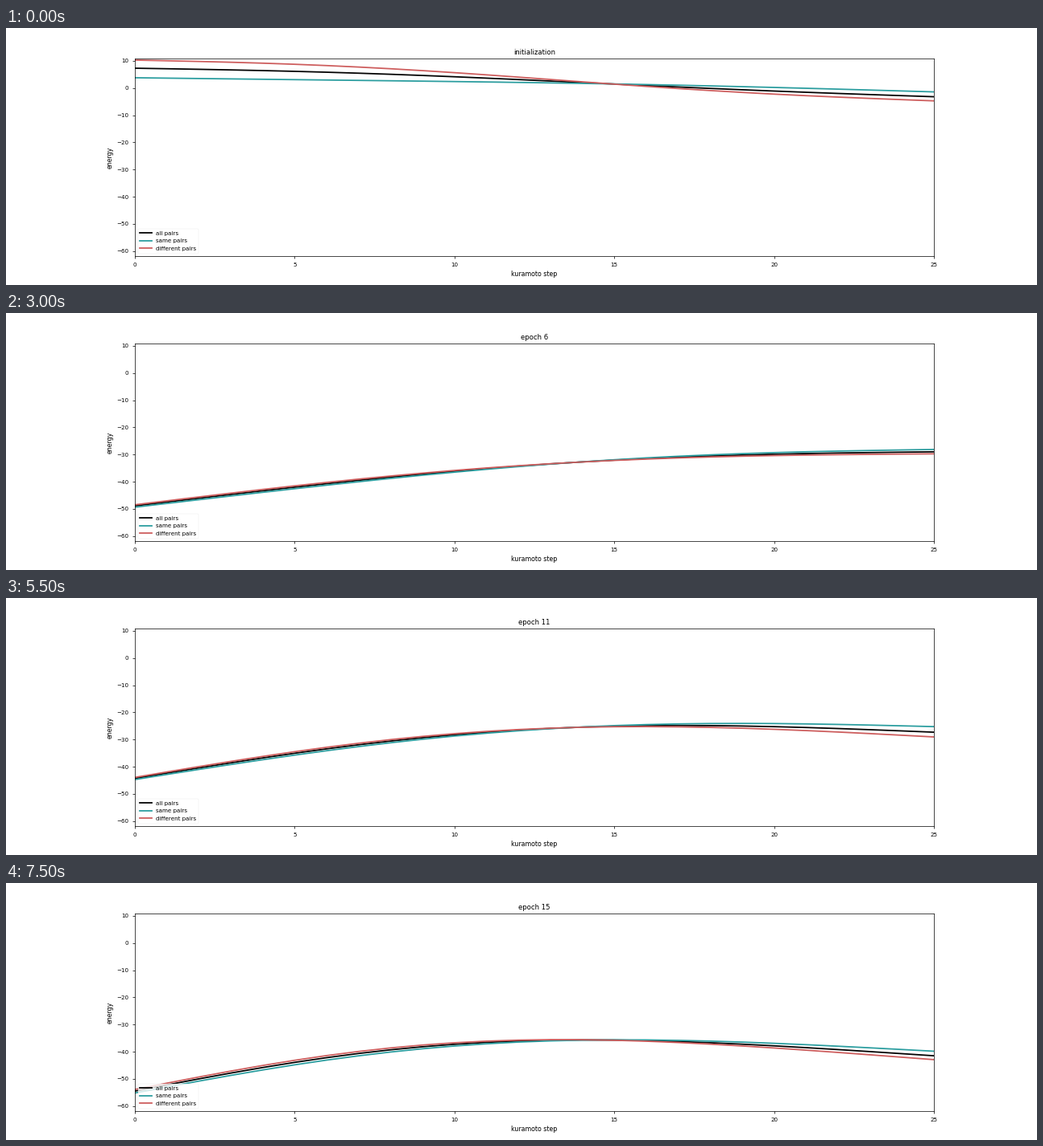
A matplotlib script for the animation above (8000 ms loop, 1280 by 320 pixels).

```python
import numpy as np
import matplotlib.pyplot as plt
from matplotlib.animation import FuncAnimation

plt.rcParams.update({
    "font.family": "DejaVu Sans",
    "axes.titlesize": 9.6,
    "axes.labelsize": 8.8,
    "legend.fontsize": 8,
    "patch.linewidth": 0.24,
    "xtick.labelsize": 8,
    "ytick.labelsize": 8,
    "xtick.major.pad": 5.6,
    "ytick.major.pad": 5.6,
    "figure.subplot.bottom": 0.1113,
})

EPOCHS = 16
STEPS = np.arange(26)
SAME_SHARE = 0.46

# Key points {epoch: value}; epochs between them are interpolated
FIRST = {0: 7.3, 1: -9, 2: -7, 3: -35, 4: -37, 5: -53, 6: -48.9, 8: -48.5,
         9: -43.7, 10: -48.4, 11: -44.3, 12: -55.2, 14: -51.8, 15: -54.5}
LAST = {0: -3.2, 1: -6, 2: -1.3, 5: -31, 6: -29, 11: -27.3, 14: -35.7, 15: -41.5}
BULGE = {0: 0.8, 2: 0, 6: 5.1, 11: 9.6, 15: 12.1}
SKEW = {0: 0.5, 2: 0.3, 8: -0.3, 15: 0.9}
GAP_FIRST = {0: -6.5, 2: 0.1, 6: -0.9, 9: 0, 11: -0.8, 14: -0.4, 15: -1.3}
GAP_LAST = {0: 3.3, 2: 1.1, 6: 1.6, 11: 3.8, 14: 5.8, 15: 3.1}


def at(track, epoch):
    return np.interp(epoch, list(track), list(track.values()))


def arc(first, last, bulge, skew):
    """Straight line bent by one half wave and one full wave."""
    u = STEPS / STEPS[-1]
    return (first + (last - first) * u
            + bulge * np.sin(np.pi * u) + skew * np.sin(2 * np.pi * u))


def energies(epoch):
    """Energy of all, same and different pairs at every step."""
    mean = arc(*(at(track, epoch) for track in (FIRST, LAST, BULGE, SKEW)))
    first, last = at(GAP_FIRST, epoch), at(GAP_LAST, epoch)
    sag = 0.48 * last * min(1, epoch / 8)
    gap = arc(first, last, -sag, 0.15 * first - 0.2)
    return mean, mean + (1 - SAME_SHARE) * gap, mean - SAME_SHARE * gap


fig, ax = plt.subplots(figsize=(20, 5), dpi=64)
lines = [ax.plot(STEPS, 0 * STEPS, color=color, lw=2, label=f"{name} pairs")[0]
         for name, color in (("all", "black"),
                             ("same", "#2a9d9f"),
                             ("different", "#cd5c5c"))]
ax.set_xlim(0, 25)
ax.set_ylim(-61.98, 10.75)
ax.set_xlabel("kuramoto step")
ax.set_ylabel("energy")
ax.legend(loc="lower left")
title = ax.set_title("")


def update(epoch):
    for line, values in zip(lines, energies(epoch)):
        line.set_ydata(values)
    title.set_text(f"epoch {epoch}" if epoch else "initialization")
    return [*lines, title]


anim = FuncAnimation(fig, update, frames=EPOCHS, interval=500, repeat=True, repeat_delay=0)
plt.show()
```
